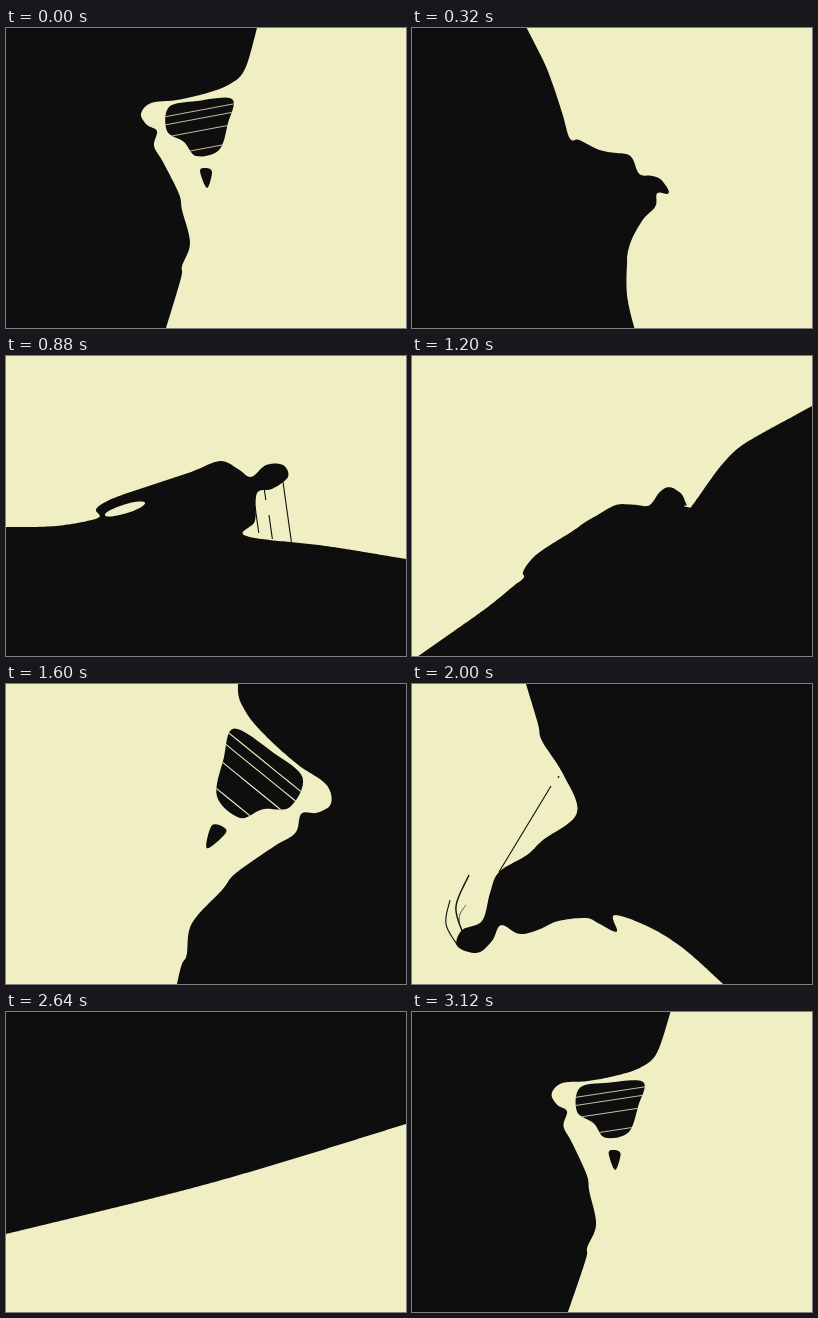
These frames come from a looping animation (400 by 300 pixels, 3.2 s). An HTML page with a canvas:

```html
<!DOCTYPE html>
<html lang="en">
<head>
<meta charset="utf-8">
<title>Turning tide of figures</title>
<style>
  html, body { margin: 0; width: 100%; height: 100%; overflow: hidden; background: #f0eec3; }
  canvas { display: block; width: 400px; height: 300px; }
</style>
</head>
<body>
<canvas id="stage" width="400" height="300"></canvas>
<script>
const LOOP = 3200, STEP = 80, SAMPLES = 240;
const INK = '#0e0e0e', PAPER = '#f0eec3';
const CX = 200, CY = 150;
const PIVOT = [200, 160];
const g = document.getElementById('stage').getContext('2d');

const rad = deg => deg * Math.PI / 180;
const mix = (a, b, k) => a + (b - a) * k;
const heading = t => rad(107 - 360 * t / LOOP);
const pairs = list => list.flatMap((x, i) => i % 2 ? [] : [[x, list[i + 1]]]);

// Smooth curve through key points.
function curve(pts, closed) {
  const n = pts.length, out = [];
  const at = i => closed ? pts[(i + n) % n] : pts[Math.max(0, Math.min(n - 1, i))];
  for (let i = 0; i < (closed ? n : n - 1); i++) {
    const [a, b, c, d] = [at(i - 1), at(i), at(i + 1), at(i + 2)];
    for (let u = 0; u < 1; u += 1 / 8) {
      out.push([0, 1].map(j => b[j] + u / 2 * (c[j] - a[j]
        + u * (2 * a[j] - 5 * b[j] + 4 * c[j] - d[j]
        + u * (3 * (b[j] - c[j]) + d[j] - a[j])))));
    }
  }
  if (!closed) out.push(pts[n - 1]);
  return out;
}

function resample(pts) {
  const len = [0];
  for (let i = 1; i < pts.length; i++)
    len.push(len[i - 1] + Math.hypot(pts[i][0] - pts[i - 1][0], pts[i][1] - pts[i - 1][1]));
  const out = [], total = len[len.length - 1];
  for (let s = 0, i = 1; s <= SAMPLES; s++) {
    const d = total * s / SAMPLES;
    while (i < pts.length - 1 && len[i] < d) i++;
    const k = (d - len[i - 1]) / (len[i] - len[i - 1]);
    out.push([0, 1].map(j => mix(pts[i - 1][j], pts[i][j], k)));
  }
  return out;
}

function trace(pts) {
  g.beginPath();
  pts.forEach(([x, y]) => g.lineTo(x, y));
}

function blob(list, color) {
  trace(curve(pairs(list), true));
  g.fillStyle = color;
  g.fill();
}

function thread(list, color, width = 1.1) {
  trace(curve(pairs(list)));
  g.strokeStyle = color;
  g.lineWidth = width;
  g.stroke();
}

function slit(x, y, rx, ry, tilt) {
  g.beginPath();
  g.ellipse(x, y, rx, ry, rad(tilt), 0, 7);
  g.fillStyle = PAPER;
  g.fill();
}

// The pale figure is one shape, turned, mirrored and scaled about its pivot.
const paleShore = pairs([251,0, 239,41, 224,56, 201,65, 171,72, 145,75, 135,86, 141,97, 151,103,
  148,118, 157,134, 173,166, 176,182, 184,215, 176,238, 175,250, 160,300]);

function paleMarks() {
  blob([194,143, 200,140, 206,144, 201,160], INK);
  blob([163,79, 191,73, 226,71, 222,95, 213,122, 190,128, 178,114, 161,103], INK);
  g.clip();
  for (let i = 0, y = 82, gap = 8.2; i < 4; i++, y += gap, gap *= 1.5)
    thread([155, y + 7.5, 235, y - 7.5], PAPER, 0.8);
}

function pale(t, at, spin, size, flip, life) {
  const c = Math.cos(rad(spin)) * size, s = Math.sin(rad(spin)) * size;
  const shore = paleShore.map(([x, y]) => {
    const dx = (x - PIVOT[0]) * flip, dy = y - PIVOT[1];
    return [at[0] + dx * c - dy * s, at[1] + dx * s + dy * c];
  });
  if (flip < 0) shore.reverse();
  const marks = () => {
    g.translate(...at);
    g.rotate(rad(spin));
    g.scale(size * flip, size);
    g.translate(-PIVOT[0], -PIVOT[1]);
    paleMarks();
  };
  return { t, shore, marks, mid: [mix(at[0], shore[8][0], 0.3), at[1] - 60], life };
}

// Shorelines run with ink on the right-hand side of travel.
const poses = [
  pale(0, PIVOT, 0, 1, 1, [0, 240]),
  { t: 560, mid: [206, 115], life: [180, 180],
    shore: pairs([0,47, 66,88, 130,116, 166,130, 184,113, 225,93, 258,84, 278,98, 290,92,
      302,90, 315,101, 311,108, 280,114, 278,134, 250,162, 234,200, 246,257, 278,300]),
    marks() {
      slit(189, 121, 7, 2.8, -22);
      slit(222, 109, 8, 2.4, -15);
    } },
  { t: 880, mid: [200, 150], life: [200, 200],
    shore: pairs([0,171, 50,170, 92,162, 90,153, 108,142, 155,126, 185,116, 214,105, 232,113,
      245,121, 260,109, 277,109, 282,121, 266,133, 251,137, 249,165, 240,180, 320,190, 400,203]),
    marks() {
      slit(119, 153, 21, 4.5, -17);
      for (const [x, y, fall] of [[258, 131, 13], [277, 126, 60], [249, 150, 27], [263, 159, 24]])
        thread([x, y, x + fall * 0.14, y + fall], INK);
    } },
  pale(1600, [202, 165], 28.5, 1.33, -1, [240, 200]),
  { t: 2000, mid: [80, 210], life: [180, 240],
    shore: pairs([311,300, 272,265, 237,243, 202,231, 205,248, 186,239, 174,234, 146,237,
      126,246, 107,250, 89,241, 80,257, 65,269, 45,262, 50,246, 70,237, 78,209, 87,188,
      115,171, 131,156, 165,129, 151,90, 130,57, 126,40, 114,0]),
    marks() {
      thread([87,188, 139,102], INK);
      thread([146,94, 147,92], INK);
      thread([57,191, 44,222, 50,247], INK, 1.4);
      thread([38,216, 34,240, 46,262], INK);
      thread([54,221, 48,230, 47,239], INK, 0.7);
    } },
  { t: 2640, shore: pairs([400,112, 205,171, 0,222]) },
  pale(3120, [202, 158], 2, 1, 1, [240, 0])
];

function extend(end, inner) {
  const dx = end[0] - inner[0], dy = end[1] - inner[1], k = 400 / Math.hypot(dx, dy);
  return [end[0] + dx * k, end[1] + dy * k];
}

// Shoreline in the turning frame, where ink lies below.
function level({ t, shore }) {
  const p = resample(curve(shore));
  const n = p.length, c = Math.cos(heading(t)), s = Math.sin(heading(t));
  return [extend(p[0], p[2]), ...p, extend(p[n - 1], p[n - 3])]
    .map(([x, y]) => [(x - CX) * c + (y - CY) * s, (y - CY) * c - (x - CX) * s]);
}

const shores = poses.map(p => ({ t: p.t, pts: level(p) }));
shores.push({ t: LOOP, pts: shores[0].pts });

function drawShore(t) {
  const i = shores.findIndex(s => s.t > t);
  const a = shores[i - 1], b = shores[i], k = (t - a.t) / (b.t - a.t);
  const pts = a.pts.map((p, j) => p.map((v, axis) => mix(v, b.pts[j][axis], k)));
  g.save();
  g.translate(CX, CY);
  g.rotate(heading(t));
  trace([...pts, [1200, 1000], [-1200, 1000]]);
  g.fillStyle = INK;
  g.fill();
  g.restore();
}

// Marks swell and shrink around their pose while turning along.
function drawMarks({ t: peak, marks, mid, life }, t) {
  if (!marks) return;
  const dt = (t - peak + LOOP * 1.5) % LOOP - LOOP / 2;
  const size = dt ? 1 - Math.abs(dt) / life[dt < 0 ? 0 : 1] : 1;
  if (!(size > 0)) return;
  g.save();
  g.translate(CX, CY);
  g.rotate(rad(-dt * 0.06));
  g.translate(mid[0] - CX, mid[1] - CY);
  g.scale(size, size);
  g.translate(-mid[0], -mid[1]);
  marks();
  g.restore();
}

function draw(t) {
  g.fillStyle = PAPER;
  g.fillRect(0, 0, 400, 300);
  drawShore(t);
  poses.forEach(p => drawMarks(p, t));
}

const start = performance.now();
function tick() {
  const t = (performance.now() - start) % LOOP;
  draw(Math.floor(t / STEP) * STEP);
  requestAnimationFrame(tick);
}
tick();
</script>
</body>
</html>
```
